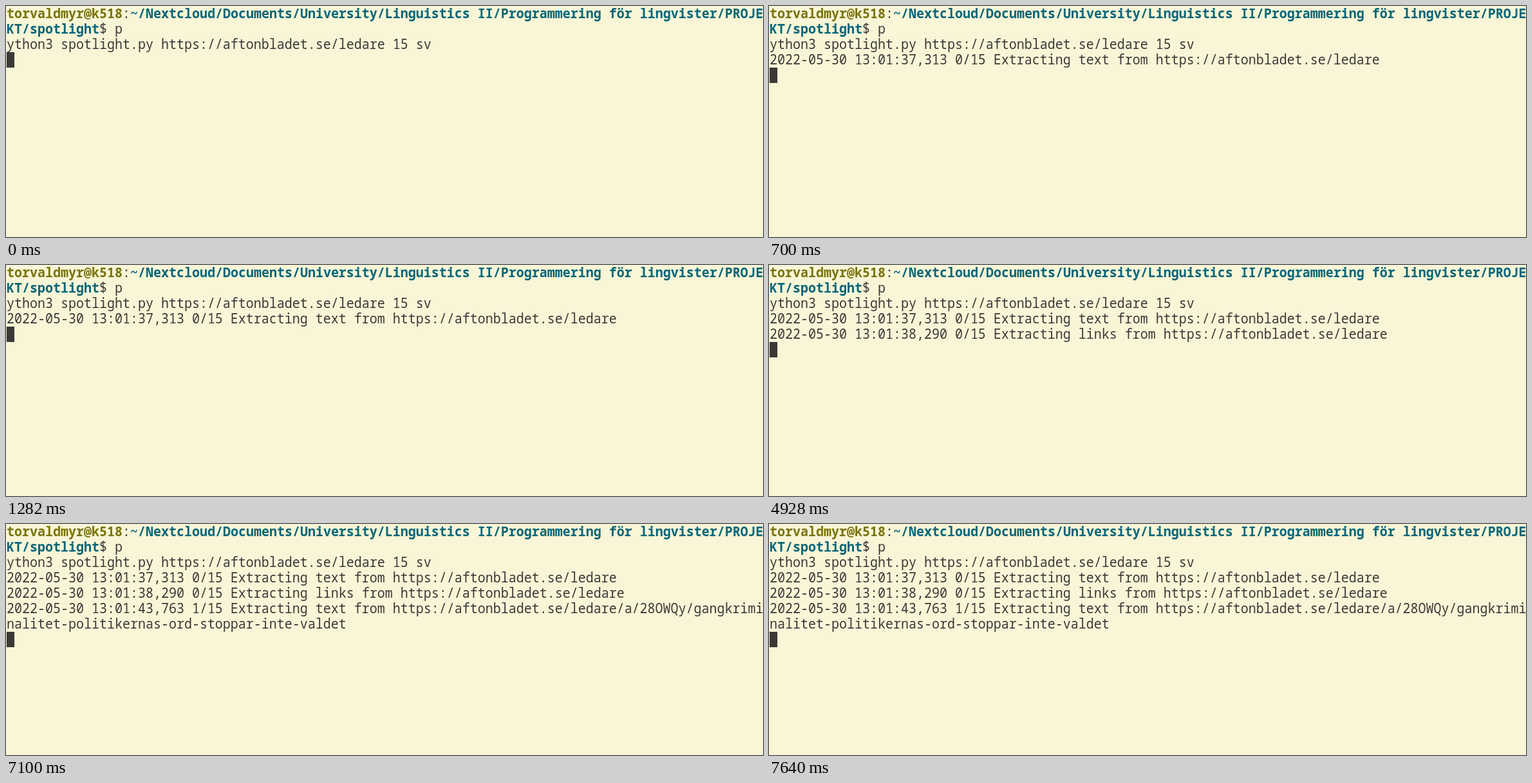
Write an HTML page that moves like this. It is 1176x360 px and loops after 8000 ms.

```html
<!DOCTYPE html>
<html lang="en">
<head>
<meta charset="utf-8">
<title>Terminal</title>
<style>
  html, body { margin: 0; width: 100%; height: 100%; overflow: hidden; background: #f9f5d7; }
  svg { display: block; width: 1176px; height: 360px; }
  text {
    font: 20px "Noto Sans Mono", "DejaVu Sans Mono", monospace;
    font-variant-ligatures: none;
    white-space: pre;
    fill: #3c3836;
  }
  .user, .path { font-weight: bold; }
  .user { fill: #79740e; }
  .path { fill: #076678; }
</style>
</head>
<body>
<svg id="screen" viewBox="0 0 1176 360">
  <rect width="1176" height="360" fill="#f9f5d7"/>
  <g id="lines"></g>
  <rect id="cursor" x="1" width="12" height="24" fill="#3c3836"/>
</svg>
<script>
const NS = "http://www.w3.org/2000/svg";
const LOOP = 8000, ROW = 24, COL = 12, LEFT = 1, BASE = 19;
const TALL = 1.1; // the terminal face is taller than the installed ones
const url = "https://aftonbladet.se/ledare";

// Each row: time it appears, then [text, class] runs.
const rows = [
  [0, ["torvaldmyr@k518", "user"], [":"],
      ["~/Nextcloud/Documents/University/Linguistics II/Programmering för lingvister/PROJE", "path"]],
  [0, ["KT/spotlight", "path"], ["$ p"]],
  [0, [`ython3 spotlight.py ${url} 15 sv`]],
  [700, [`2022-05-30 13:01:37,313 0/15 Extracting text from ${url}`]],
  [1670, [`2022-05-30 13:01:38,290 0/15 Extracting links from ${url}`]],
  [7100, [`2022-05-30 13:01:43,763 1/15 Extracting text from ${url}/a/28OWQy/gangkrimi`]],
  [7100, ["nalitet-politikernas-ord-stoppar-inte-valdet"]]
];

const lines = document.getElementById("lines");
const cursor = document.getElementById("cursor");

const groups = rows.map(([, ...runs], i) => {
  const g = lines.appendChild(document.createElementNS(NS, "g"));
  g.setAttribute("transform", `translate(${LEFT} ${i * ROW + BASE}) scale(1 ${TALL})`);
  let col = 0;
  for (const [str, cls] of runs) {
    const t = g.appendChild(document.createElementNS(NS, "text"));
    t.setAttribute("x", col * COL);
    if (cls) t.setAttribute("class", cls);
    t.textContent = str;
    col += str.length;
  }
  return g;
});

function draw(ms) {
  const shown = rows.filter(r => r[0] <= ms).length;
  groups.forEach((g, i) => g.setAttribute("visibility", i < shown ? "visible" : "hidden"));
  cursor.setAttribute("y", shown * ROW);
}

function tick() {
  draw(performance.now() % LOOP);
  requestAnimationFrame(tick);
}
tick();
</script>
</body>
</html>
```
